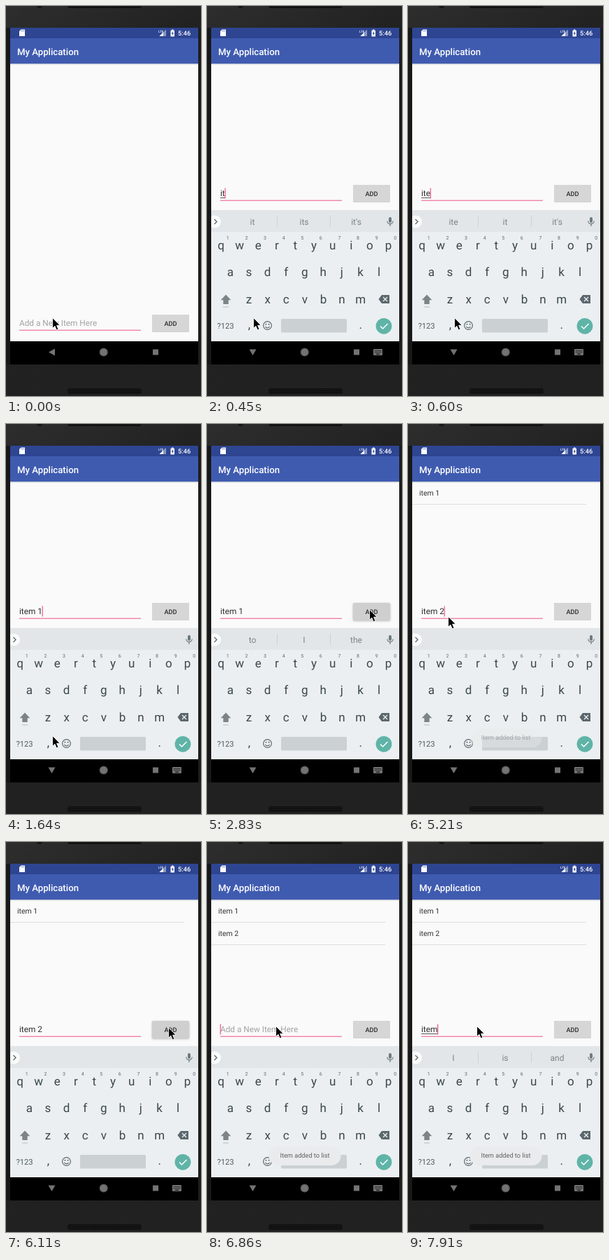
An HTML page that plays this animation: 279 px wide and 556 px high, repeating every 8 s.

```html
<!DOCTYPE html>
<html lang="en">
<head>
<meta charset="utf-8">
<title>List app demo</title>
<style>
html, body { margin: 0; width: 100%; height: 100%; overflow: hidden; background: #222; }
svg { display: block; width: 100vw; height: 100vh; font-family: Roboto, sans-serif; text-rendering: geometricPrecision; }
.mid { text-anchor: middle; }
.med { font-weight: 500; }
.key { font-size: 17px; fill: #3b474d; }
.hint { font-size: 7px; fill: #5f6a70; }
.sug { font-size: 12px; fill: #788388; }
.field { font-size: 11.8px; }
.row { font-size: 10.46px; fill: #333; }
.small { font-size: 9.2px; }
.icon { fill: #6d7a81; }
.nav { fill: #737373; }
</style>
</head>
<body>
<svg viewBox="0 0 279 556">
  <defs>
    <pattern id="grain" width="4" height="4" patternUnits="userSpaceOnUse">
      <path d="M0 0h2v2h-2zM2 2h2v2h-2z" fill="#000" fill-opacity=".1"/>
    </pattern>
    <linearGradient id="body" x2=".3" y2="1">
      <stop offset="0" stop-color="#303030"/>
      <stop offset=".3" stop-color="#242424"/>
      <stop offset="1" stop-color="#232323"/>
    </linearGradient>
    <pattern id="grill" width="3" height="3" patternUnits="userSpaceOnUse">
      <rect width="3" height="3" fill="#101010"/>
      <rect width="1.5" height="1.5" fill="#1c1c1c"/>
    </pattern>
    <clipPath id="screen"><rect x="6" y="31" width="269" height="480"/></clipPath>
  </defs>

  <!-- phone body -->
  <rect width="279" height="556" fill="url(#body)"/>
  <rect width="279" height="556" fill="url(#grain)"/>
  <rect y="31" width="6" height="480" fill="#181818"/>
  <rect x="275" y="31" width="4" height="480" fill="#1d1d1d"/>
  <circle cx="48" cy="-1" r="4" fill="#151515"/>
  <rect x="88" y="-6" width="106" height="9" rx="3" fill="url(#grill)"/>
  <rect x="88" y="545" width="106" height="8" rx="3" fill="url(#grill)"/>

  <g clip-path="url(#screen)">
    <rect x="6" y="31" width="269" height="480" fill="#fafafa"/>
    <rect x="6" y="82" width="269" height="1" fill="#b9bfd2"/>
    <rect x="6" y="83" width="269" height="1" fill="#e9e9ec"/>
    <rect x="6" y="46" width="269" height="36" fill="#3f5bb0"/>
    <rect x="6" y="31" width="269" height="15" fill="#2e4592"/>
    <text class="med" x="16" y="69.500" font-size="13.200" fill="#fff">My Application</text>

    <!-- status icons -->
    <path d="M21.500 33.500H27v9.500h-8V36z" fill="#fff"/>
    <path d="M22 34.700v1.600M23.700 34.700v1.600M25.400 34.700v1.600" stroke="#2e4592" stroke-width=".7"/>
    <path d="M229 33.500v9.500h-9.500z" fill="#8797c4"/>
    <path d="M225 37.500v5.500h-5.500z" fill="#fff"/>
    <text class="med" x="218" y="37.500" font-size="4.500" fill="#fff">LTE</text>
    <path d="M237 33.500h2.500v1.200h1.500v8.800h-5.500v-8.800h1.500z" fill="#fff"/>
    <path d="M238.700 36l-2 3.500h1.300v2.500l2-3.500h-1.300z" fill="#2e4592"/>
    <text class="med small" x="246" y="42" fill="#fff">5:46</text>

    <g id="rows"></g>

    <!-- entry bar -->
    <g id="bar">
      <text id="entry" class="field" x="19" y="456.400"></text>
      <rect id="comp" x="19" y="458" height=".9" fill="#444"/>
      <rect id="caret" y="444.500" width="1.200" height="15" fill="#f0558a"/>
      <rect x="19" y="461.600" width="174" height="1.400" fill="#f283a6"/>
      <rect id="btn" x="209" y="440" width="53" height="24.700" rx="1.500"/>
      <text class="med small mid" x="235.500" y="455.600" fill="#2b2b2b">ADD</text>
    </g>

    <!-- keyboard -->
    <g id="kb">
      <rect x="6" y="291" width="269" height="187" fill="#ebeff1"/>
      <rect x="6" y="291" width="269" height="31" fill="#e2e6e8"/>
      <circle cx="11" cy="307.500" r="9" fill="#fafbfb"/>
      <path d="M10.500 304l3.500 3.500-3.500 3.500" fill="none" stroke="#5c686e" stroke-width="1.300"/>
      <rect x="260" y="301" width="4" height="8" rx="2" class="icon"/>
      <path d="M257.800 306.500a4.200 4.200 0 0 0 8.400 0M262 311v3" fill="none" stroke="#6d7a81" stroke-width="1.200"/>
      <g id="sugs">
        <path d="M100.500 299v16M176.500 299v16" stroke="#cdd2d5"/>
        <text class="sug mid" x="65" y="312"></text>
        <text class="sug mid" x="139" y="312"></text>
        <text class="sug mid" x="213.500" y="312"></text>
      </g>
      <g id="keys"></g>
      <path d="M27 411.500l7.300 7.800h-3.600v5.700h-7.400v-5.700h-3.600z" fill="#7d8487"/>
      <rect x="23" y="428.500" width="8" height="1" fill="#b5bcc0"/>
      <path d="M245.500 418l4.500-6h11v12h-11z" fill="#5b676d"/>
      <path d="M252 415l6 6M258 415l-6 6" stroke="#ebeff1" stroke-width="1.300"/>
      <text x="14.500" y="460" font-size="11.200" fill="#4f5b61">?123</text>
      <g fill="none" stroke="#5d696f" stroke-width="1.200">
        <circle cx="86.500" cy="455.500" r="5.900"/>
        <path d="M83.300 457a3.500 3 0 0 0 6.400 0"/>
      </g>
      <circle cx="84.400" cy="453.700" r="1" fill="#5d696f"/>
      <circle cx="88.600" cy="453.700" r="1" fill="#5d696f"/>
      <rect x="106" y="446" width="94" height="19.500" rx="1.500" fill="#cbd0d3"/>
      <circle cx="253" cy="456.300" r="11.400" fill="#5fb4a7"/>
      <path d="M248 456.500l3.500 3.500 7-7" fill="none" stroke="#fff" stroke-width="1.500"/>
    </g>

    <g id="toast">
      <rect x="88.500" y="434" width="103" height="27" rx="13.500" fill="#e9ebec"/>
      <text class="small mid" x="140" y="449.700" fill="#5f6163">Item added to list</text>
    </g>

    <!-- navigation -->
    <rect x="6" y="478" width="269" height="33" fill="#000"/>
    <path id="back" class="nav"/>
    <circle cx="139.700" cy="493.500" r="5.500" fill="#737373" stroke="#555" stroke-width="1.200"/>
    <rect class="nav" x="210" y="489.500" width="8" height="8"/>
    <g id="ime">
      <rect class="nav" x="238" y="489" width="13" height="9" rx="1"/>
      <path d="M240 491.500h9.500M240 493.700h9.500" stroke="#000" stroke-width="1" stroke-dasharray="1.200 .9"/>
      <path d="M242 496.200h5" stroke="#000"/>
    </g>
  </g>

  <path id="mouse" d="M.6 .6v14.800l3.300-3.100 2.300 5.500 2.700-1.100-2.300-5.400h4.600z" fill="#000" stroke="#fff" stroke-width=".9"/>
</svg>
<script>
const LOOP = 8000;
const el = id => document.getElementById(id);
const show = (node, on) => node.setAttribute('visibility', on ? 'visible' : 'hidden');

function add(parent, tag, attrs, text = '') {
  const node = document.createElementNS('http://www.w3.org/2000/svg', tag);
  for (const k in attrs) node.setAttribute(k, attrs[k]);
  node.textContent = text;
  parent.append(node);
  return node;
}

function keyRow(chars, x, y, cls = 'key') {
  [...chars].forEach((c, i) =>
    add(el('keys'), 'text', { class: cls + ' mid', x: x + i * 26.6, y }, c));
}
keyRow('qwertyuiop', 20, 347.4);
keyRow('asdfghjkl', 33.3, 385.3);
keyRow('zxcvbnm', 60, 424.4);
keyRow(',', 60.5, 460);
keyRow('.', 219.7, 460);
keyRow('1234567890', 29.8, 333, 'hint');

const rows = [1, 2].map(n => {
  const y = 82.5 + n * 32;
  const g = add(el('rows'), 'g', {});
  add(g, 'text', { class: 'row', x: 16, y: y - 12.1 }, 'item ' + n);
  add(g, 'rect', { x: 6, y: y - .5, width: 249, height: 1, fill: '#dedede' });
  return g;
});

// One typing step: composing text with its three suggestions
const type = (txt, sug) => ({ txt, sug, comp: 1, caret: 1 });
const I = type('i', 'i I it\'s');
const IT = type('it', 'it its it\'s');
const ITE = type('ite', 'ite it it\'s');
const ITEM = type('item', 'item items itemized');
const NEXT = 'I is and';
const SPACE = { txt: 'item\u00a0', comp: 0, caret: 1 };

// Each entry overrides part of the state from its time on
const steps = [
  [0, { txt: '', sug: '', comp: 0, caret: 0, kb: 0, items: 0, toast: 0, press: 0, at: [66, 444] }],
  [300, { ...I, kb: 1 }],
  [450, IT],
  [600, ITE],
  [750, ITEM],
  [900, { ...SPACE, sug: NEXT }],
  [1340, { caret: 0 }],
  [1640, { txt: 'item 1', sug: '', caret: 1 }],
  [1790, { sug: 'to I the' }],
  [2090, { at: [100, 402] }],
  [2240, { at: [190, 305], caret: 0 }],
  [2380, { at: [232, 264] }],
  [2680, { press: .6 }],
  [2830, { press: 1 }],
  [2980, { press: .5, txt: '', items: 1, caret: 1 }],
  [3130, { press: 0, toast: .5 }],
  [3280, { toast: 1, at: [205, 267] }],
  [3430, { at: [125, 272] }],
  [3570, { at: [70, 274], caret: 0 }],
  [3720, { at: [57, 274] }],
  [3870, I],
  [4020, IT],
  [4170, ITE],
  [4320, ITEM],
  [4460, SPACE],
  [4760, { sug: NEXT }],
  [5060, { txt: 'item 2', sug: '', caret: 1 }],
  [5210, { toast: .4 }],
  [5360, { toast: 0, at: [78, 273] }],
  [5510, { at: [150, 269] }],
  [5660, { at: [215, 265], caret: 0 }],
  [5810, { at: [232, 264] }],
  [5960, { press: .8 }],
  [6110, { press: 1 }],
  [6260, { press: .4, txt: '', items: 2, caret: 1 }],
  [6410, { press: 0, toast: .5, at: [215, 264] }],
  [6560, { toast: 1, at: [150, 263], caret: 0 }],
  [6710, { at: [108, 262] }],
  [6860, { at: [98, 262], caret: 1 }],
  [7010, { caret: 0 }],
  [7160, I],
  [7460, IT],
  [7610, ITE],
  [7760, ITEM],
  [7910, { sug: NEXT }]
];

const entry = el('entry');
const sugText = el('sugs').querySelectorAll('text');
let last = -1;

function draw(s) {
  show(el('kb'), s.kb);
  show(el('ime'), s.kb);
  el('back').setAttribute('d', s.kb ? 'M60.500 489.500h10l-5 8.500z' : 'M61 493.500l9-5v10z');
  el('bar').setAttribute('transform', `translate(0 ${s.kb ? -185 : 0})`);

  entry.textContent = s.txt || 'Add a New Item Here';
  entry.setAttribute('fill', s.txt ? '#303030' : '#a3a3a3');
  const w = s.txt ? entry.getComputedTextLength() : 0;
  el('comp').setAttribute('width', s.comp ? w : 0);
  el('caret').setAttribute('x', 18.7 + w);
  show(el('caret'), s.caret);

  const g = 214 - 7 * s.press;
  const blur = .6 + 1.2 * s.press;
  el('btn').setAttribute('fill', `rgb(${g},${g},${g})`);
  el('btn').style.filter = `drop-shadow(0 ${blur}px ${blur}px rgba(0,0,0,.28))`;

  const words = s.sug.split(' ');
  el('sugs').setAttribute('display', s.sug ? 'inline' : 'none');
  sugText.forEach((t, i) => t.textContent = words[i] || '');

  rows.forEach((r, i) => show(r, i < s.items));
  el('toast').setAttribute('opacity', s.toast);
  el('mouse').setAttribute('transform', `translate(${s.at})`);
}

function tick() {
  const t = performance.now() % LOOP;
  const past = steps.filter(([start]) => start <= t);
  if (past.length !== last) {
    last = past.length;
    draw(Object.assign({}, ...past.map(p => p[1])));
  }
  requestAnimationFrame(tick);
}
tick();
</script>
</body>
</html>
```
